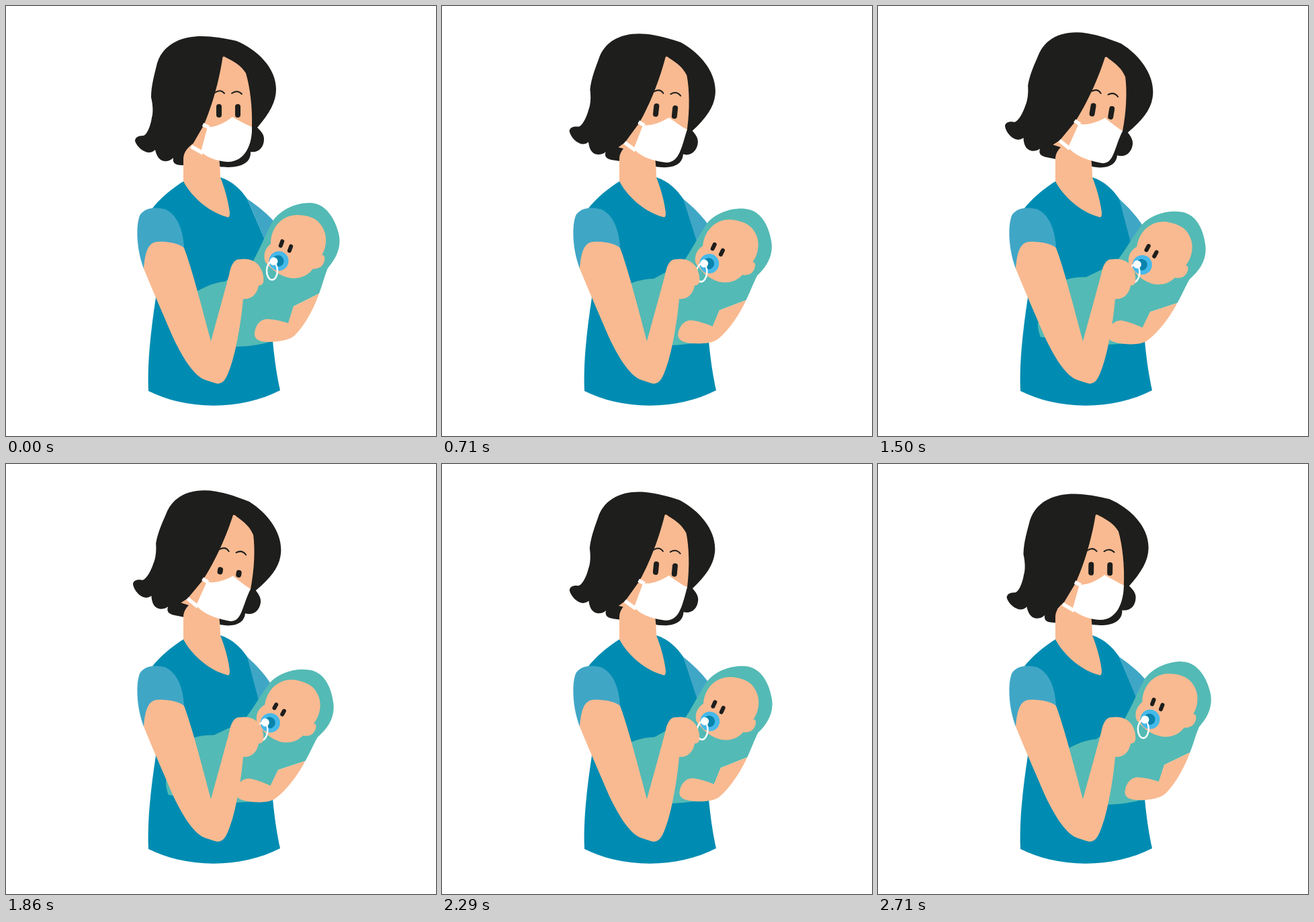
An HTML page for the animation above (2780 ms loop, 640 px wide and 640 px high).

```html
<!DOCTYPE html>
<html lang="en">
<head>
<meta charset="utf-8">
<title>Mother and baby</title>
<style>
  html, body { margin: 0; width: 100%; height: 100%; overflow: hidden; background: #fff; }
  svg { display: block; width: 100%; height: 100%; }
  .hair { fill: #1e1e1c; }
  .skin { fill: #f9ba91; }
  .shirt { fill: #008cb2; }
  .sleeve { fill: #40a6c6; }
  .wrap { fill: #54bab5; }
  .mask { fill: #fff; }
  .brow { fill: none; stroke: #1e1e1c; stroke-width: 2; stroke-linecap: round; }
  .strap { fill: none; stroke: #fff; stroke-width: 5.5; }
</style>
</head>
<body>
<svg viewBox="0 0 640 640">
  <path class="shirt" d="M264 261C245 273 228 288 218 301L215 380L223 434C216 480 210 530 212 573C270 602 350 602 408 572C402 545 399 520 397 498L384 345L359 287C350 274 338 261 319 255Z"/>

  <path id="hair" class="hair" d="M374 181C392 160 402 143 402 124C402 92 374 65 343 52C325 48 308 45 291 45C262 45 234 56 225 85C221 102 216 118 216 136C219 148 219 160 217 166C215 180 209 193 204 193C196 193 192 196 192 201C195 210 205 218 213 218Q218 218 222 214C225 228 232 231 237 231Q244 231 249 226C247 236 256 237 264 237L317 239C350 243 365 233 364 217C374 219 384 212 384 198C384 190 378 185 374 181Z"/>

  <path class="skin" d="M264 261V228C264 218 270 211 278 205L317 225Q319 240 319 255C325 270 331 290 333 308Q333 316 329 314C305 308 278 287 264 261Z"/>

  <g id="head">
    <path class="skin" d="M322.5 76Q324 74 328 77C342 84 350 89 357 100C363 120 367 150 366 180L350 215L300 222L267 217L276 209L294 178C303 158 316 120 322.5 76Z"/>
    <path class="brow" d="M311 129Q319 123 325 130M336 130Q344 124 351 131"/>
    <g class="hair">
      <rect class="eye" x="313" width="8" rx="4"/>
      <rect class="eye" x="341" width="8" rx="4"/>
    </g>
    <path class="strap" d="M293 176.500L302 180.500M275.500 209L293 219"/>
    <path id="mask" class="mask"/>
  </g>

  <path id="sleeve" class="sleeve" d="M359 287C375 298 388 308 400 322L386 350Z"/>

  <g id="baby">
    <path class="wrap" d="M452 293C475 293 489 315 495 338C500 358 492 375 479 390C474 402 472 412 466 428L428 447L420 474L400 498C380 504 360 507 343 507L272 508Q263 492 266 480L270 433C288 422 305 412 326 410L366 383C378 362 386 340 397 320C408 304 430 293 452 293Z"/>
    <path class="skin" d="M394 354C394 330 410 312 432 311C450 311 462 316 468 325C480 340 477 360 470 371C476 369 476 382 469 388Q463 392 457 391C448 403 436 406 424 405C405 402 394 390 386 381C382 370 386 360 394 354Z"/>
    <g class="hair">
      <rect class="babyEye" x="407" width="6" rx="3" transform="rotate(20 410 353.500)"/>
      <rect class="babyEye" x="420" width="6" rx="3" transform="translate(0 7.500) rotate(20 423 353.500)"/>
    </g>
    <circle cx="406" cy="379.500" r="14.500" fill="#45b9ea"/>
    <circle cx="405" cy="379.500" r="8.500" fill="#0884ad"/>
    <circle cx="398.500" cy="380" r="6" fill="#fff"/>
    <ellipse cx="396" cy="394" rx="8" ry="13.500" fill="none" stroke="#fff" stroke-width="2.500"/>
    <path class="skin" d="M466 428L428 447L420 472C408 468 395 466 388 466C376 467 370 478 370 490C372 500 385 500 395 500C410 499 422 497 430 490C446 474 459 448 466 428Z"/>
  </g>

  <path class="sleeve" d="M205 391C194 362 193 328 199 312C205 300 224 298 238 303C258 313 264 340 265 360L240 385Z"/>
  <path class="skin" d="M332 400C335 384 340 376 349 377C360 375 371 379 377 387C383 396 384 405 383 411C382 415 379 416 376 416C374 428 366 437 353 436C350 470 342 520 330 548C325 560 320 562 314 562C306 560 302 558 298 557C280 552 262 522 248 492C236 464 222 432 205 391C207 365 212 352 225 351C245 350 260 355 265 360C275 385 292 450 305 499C314 466 324 430 332 400Z"/>
</svg>
<script>
const LOOP = 2780, STEPS = 39;
const $ = id => document.getElementById(id);
const all = name => document.querySelectorAll('.' + name);
const clamp = v => Math.max(0, Math.min(1, v));
const smooth = v => v * v * (3 - 2 * v);

// id, full swing in degrees, pivot
const swings = [
  ['hair', 9.3, 328, 171],
  ['head', 9.3, 328, 171],
  ['sleeve', 8.5, 359, 287],
  ['baby', 8.5, 361, 297]
].map(([id, deg, x, y]) => ({ el: $(id), deg, x, y }));

const mask = $('mask'), eyes = all('eye'), babyEyes = all('babyEye');

// Eased lean in, hold, steady return
const lean = n => n < 27 ? smooth(clamp((n - 3) / 11.5)) : 1 - (n - 27) / 12;

// The cheek flattens and the chin squares off as the head leans
const maskPath = p => `M300 180C311 181 326 174 337 165C346 170 356 176 366 180
  C${367 - 10 * p} ${205 + 3 * p} ${356 + 6 * p} ${232 + 2 * p} ${330 + 10 * p} 232
  C315 231 300 226 290 217Z`;

const openness = (n, mid, low) =>
  Math.min(1, ...[mid, mid + 18].map(m => low + Math.abs(n - m) * 0.45));

function setEyes(list, bottom, height) {
  for (const eye of list) {
    eye.setAttribute('y', bottom - height);
    eye.setAttribute('height', height);
  }
}

function draw(n) {
  const p = lean(n);
  for (const s of swings) s.el.setAttribute('transform', `rotate(${s.deg * p} ${s.x} ${s.y})`);
  mask.setAttribute('d', maskPath(p));
  setEyes(eyes, 166, 20 * openness(n, 7, 0.1));
  setEyes(babyEyes, 360, 13 * openness(n, 6, 0));
}

const start = performance.now();
function tick() {
  const t = (performance.now() - start) % LOOP;
  draw(Math.floor((t + 3) / LOOP * STEPS) % STEPS);
  requestAnimationFrame(tick);
}
tick();
</script>
</body>
</html>
```
